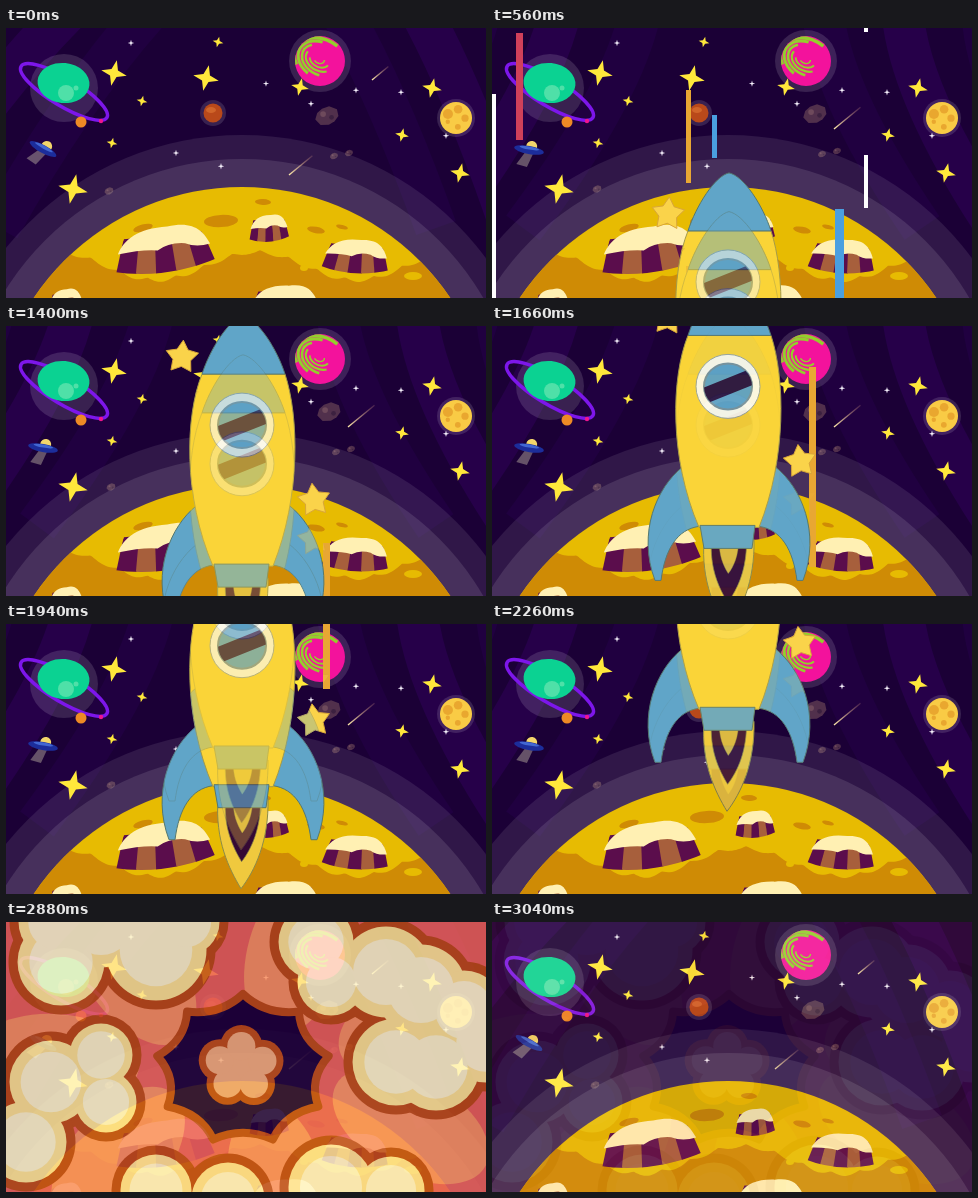
Recreate the animation shown at these times as an HTML page with a canvas. Size 480x270 px, loop 3.06 s.

```html
<!DOCTYPE html>
<html lang="en">
<head>
<meta charset="utf-8">
<title>Rocket launch</title>
<style>
html, body { margin: 0; width: 100%; height: 100%; overflow: hidden; background: #1b0036; }
canvas { display: block; width: 100vw; height: 100vh; }
</style>
</head>
<body>
<canvas id="stage" width="480" height="270"></canvas>
<script>
const W = 480, H = 270, LOOP = 3060, TAU = Math.PI * 2;
const INK = '#bd4a14', YELLOW = '#fdd04d', BLUE = '#60a5c8', RIM = '#55776e', GOLD = '#fad437';
let g;

// ---- helpers ----
function paint(fill, stroke, width = 1) {
  if (fill) { g.fillStyle = fill; g.fill(); }
  if (stroke) { g.strokeStyle = stroke; g.lineWidth = width; g.stroke(); }
}

function oval(x, y, rx, ry, fill, turn = 0, stroke, width) {
  g.beginPath();
  g.ellipse(x, y, rx, ry, turn, 0, TAU);
  paint(fill, stroke, width);
}
const disc = (x, y, r, fill, stroke, width) => oval(x, y, r, r, fill, 0, stroke, width);

function shape(d, fill, stroke, width) {
  const path = new Path2D(d);
  if (fill) { g.fillStyle = fill; g.fill(path); }
  if (stroke) { g.strokeStyle = stroke; g.lineWidth = width || 1; g.stroke(path); }
}

function placed(x, y, turn, draw) {
  g.save();
  g.translate(x, y);
  g.rotate(turn);
  draw();
  g.restore();
}

function star(x, y, r, points, inner, turn, fill, stroke) {
  g.beginPath();
  for (let i = 0; i < points * 2; i++) {
    const a = turn + i * Math.PI / points, d = i % 2 ? r * inner : r;
    g.lineTo(x + d * Math.sin(a), y - d * Math.cos(a));
  }
  g.closePath();
  paint(fill, stroke);
}

function seeded(seed) {
  return () => (seed = seed * 16807 % 2147483647) / 2147483647;
}

// ---- space ----
function sky(drift) {
  g.fillStyle = '#1b0036';
  g.fillRect(0, 0, W, H);
  for (const side of [-1, 1]) {
    for (let i = 0; i < 3; i++) {
      const top = 240 + side * (90 + 80 * i);
      const low = 240 + side * (190 + 75 * i) * (side < 0 ? 1.3 - 0.2 * drift : 1);
      g.beginPath();
      g.moveTo(top, -25);
      g.quadraticCurveTo((top + low) / 2 - side * 45 * drift, 60, low, 200);
      paint(null, i % 2 ? '#260049' : '#200040', 42);
    }
  }
}

function meteor(x, y, len, alpha) {
  const dx = len * 0.78, dy = -len * 0.64;
  const fade = g.createLinearGradient(x, y, x + dx, y + dy);
  fade.addColorStop(0, `rgba(255,235,170,${alpha})`);
  fade.addColorStop(1, 'rgba(190,130,120,.25)');
  g.beginPath();
  g.moveTo(x, y);
  g.lineTo(x + dx, y + dy);
  paint(null, fade, 1.4);
}

function rock(x, y, r) {
  g.beginPath();
  for (let a = 0; a < TAU; a += TAU / 9) {
    const d = r * (0.88 + 0.12 * Math.sin(a * 7));
    g.lineTo(x + d * Math.cos(a), y + d * 0.82 * Math.sin(a));
  }
  paint('#51304c');
  disc(x - r * .3, y - r * .15, r * .22, '#6e4a5c');
  disc(x + r * .35, y + r * .1, r * .18, '#3c2140');
}

function halo(x, y, r) {
  disc(x, y, r, 'rgba(255,255,255,.13)');
}

function ringed() {
  halo(58, 60, 34);
  oval(58, 64, 50, 14, null, 0.54, '#7d16ea', 3.5);
  oval(57.5, 55, 26, 20, '#0bd292', 0.1);
  disc(60, 65, 8, '#4fe0a8');
  disc(70, 60, 2.5, '#4fe0a8');
  disc(75, 94, 5.5, '#ee8a25');
  disc(95, 93, 2.2, '#f0158e');
}

function swirled() {
  halo(314, 33, 31);
  g.save();
  disc(314, 33, 25, '#f3129c');
  g.clip();
  for (let i = 0; i < 6; i++) {
    const r = 5 + i * 4, a = i * 0.55 - 0.4;
    g.beginPath();
    g.ellipse(313 + i * 0.5, 31 + i * 0.4, r * 1.15, r * 0.85, 0.5, a, a + 2.6);
    paint(null, '#93cf2c', 1.4 + i * 0.4);
  }
  g.restore();
}

function moon() {
  halo(450, 90, 19);
  disc(450, 90, 16, '#f9cb45');
  for (let i = 0; i < 5; i++) {
    const a = 3.6 + i * 1.35;
    disc(450 + 9 * Math.cos(a), 90 + 9 * Math.sin(a), 5 - i * 0.7, '#e9a72f');
  }
}

function ufo(drift) {
  placed(37, 121 + drift, 0.5 - 0.32 * drift, () => {
    shape('M-3 2H5L1 17L-10 16Z', 'rgba(205,195,175,.42)');
    disc(2, -4, 5.5, '#f3d66b');
    oval(0, 0, 15, 4, '#1c2d9b');
    oval(0, -2, 10, 1.6, '#4267d2');
  });
}

// A fan of panels below a pale, uneven cap; one unit is the full size
function crater(x, y, w, h, turn) {
  placed(x, y, turn, () => {
    g.scale(w, h);
    g.save();
    g.clip(new Path2D('M-.5 .38L-.36 -.3H.36L.5 .3Q0 .68 -.5 .38Z'));
    for (let i = 0; i < 5; i++) {
      const a = -0.5 + i * 0.2, b = a + 0.21;
      shape(`M${a * .7} -.4H${b * .7}L${b} .7H${a}Z`, i % 2 ? '#a75f3c' : '#5b0d4c');
    }
    g.restore();
    shape('M-.43 .02C-.36 -.3 -.22 -.5 .05 -.48C.3 -.56 .38 -.3 .43 -.02Q.3 .04 .2 -.08Q.05 -.14 -.06 .02Q-.2 -.04 -.43 .02Z', '#fff0b3');
  });
}

function ground() {
  const cx = 236, cy = 410, shade = '#cf8b05';
  disc(cx, cy, 303, 'rgba(255,255,255,.09)');
  disc(cx, cy, 279, 'rgba(255,255,255,.11)');
  g.save();
  disc(cx, cy, 251, '#e7bb02');
  g.clip();
  g.beginPath();
  for (let x = 0; x <= W; x += 2) {
    g.lineTo(x, 236 - 14 * Math.cos((x - 250) * Math.PI / 100) + 4 * Math.abs(Math.sin(x / 9)));
  }
  g.lineTo(W, H);
  g.lineTo(0, H);
  paint(shade);
  [[215, 193, 17], [137, 200, 10], [257, 174, 8], [310, 202, 9], [336, 199, 6]]
    .forEach(([x, y, r]) => oval(x, y, r, r * 0.36, shade, (x - cx) / 400));
  oval(298, 240, 4, 3, '#e7bb02');
  oval(407, 248, 9, 4, '#e7bb02');
  crater(158, 221, 108, 46, -0.1);
  crater(263, 200, 43, 27, -0.03);
  crater(350, 228, 72, 34, 0.1);
  crater(279, 273, 74, 32, 0);
  crater(60, 272, 36, 22, -0.1);
  g.restore();
}

function space(drift) {
  sky(drift);
  ringed();
  swirled();
  moon();
  halo(207, 85, 13);
  disc(207, 85, 9.5, '#b9491a');
  oval(205, 82, 5, 3, '#d0652a');
  [[321, 88, 13], [343, 125, 4.5], [328, 128, 4.5], [103, 163, 5]]
    .forEach(([x, y, r]) => rock(x + 2 * drift, y - 2 * drift, r));
  ground();
  [[108, 45, 13], [200, 50, 13], [136, 73, 5.5], [106, 115, 5.5], [67, 161, 15],
   [212, 14, 5.5], [294, 59, 9], [426, 60, 10], [396, 107, 7], [454, 145, 10]]
    .forEach(([x, y, r]) => star(x, y, r, 4, 0.36, 0.22, '#ffe83b'));
  const rnd = seeded(29);
  for (let i = 0; i < 8; i++) star(125 + 45 * i, 15 + 135 * rnd(), 3.2, 4, 0.32, 0, '#f4eefa');
  meteor(366 - 24 * drift, 52 + 49 * drift, 21 + 13 * drift, 1);
  if (drift < 1) meteor(283, 147, 30, 1);
  ufo(drift);
}

// ---- rocket, drawn from its tip ----
function flame(size, fill) {
  placed(0, 262, 0, () => {
    g.scale(size, size);
    shape('M-25 0C-28 42 -14 70 -2 90C12 72 26 42 25 0Z', fill, '#8a8a4a');
  });
}

function rocket(tip) {
  const line = '#a39a4a';
  placed(237, tip, 0, () => {
    flame(1, '#f0c93e');
    flame(0.7, '#350934');
    flame(0.38, '#d8b643');
    for (const side of [-1, 1]) {
      g.save();
      g.scale(side, 1);
      shape('M47 190C72 210 92 255 74 303H68C64 272 52 252 30 249Z', BLUE, RIM);
      g.restore();
    }
    shape('M-41 58C-58 100 -60 180 -30 250H30C58 180 56 100 42 58Z', GOLD, line);
    shape('M-41 58C-33 33 -14 3 0 0C15 3 34 33 42 58Z', BLUE, RIM);
    shape('M-29 248H26L23 271H-25Z', BLUE, RIM);
    disc(-1, 109, 32, '#fbf8e8', '#9aa49a');
    g.save();
    oval(-1, 109, 24, 23, '#5b9fc4', 0, '#77919a', 2);
    g.clip();
    shape('M-30 112L30 88V105L-30 129Z', '#24103f');
    g.restore();
    star(-61, 41, 17, 5, 0.55, 0.08, '#fad34a', '#d8a53a');
    star(71, 184, 17, 5, 0.55, -0.12, '#fad34a', '#d8a53a');
  });
}

// x, top, width, height; all race upwards together
const STREAKS = {
  '#d0405a': [[24, 5, 7, 107]],
  '#e8a733': [[194, 62, 5, 93], [317, 921, 7, 200]],
  '#4a9fe0': [[220, 87, 5, 43], [343, 181, 9, 120]],
  '#ffffff': [[0, 66, 4, 204], [372, -49, 4, 53], [372, 127, 4, 53]]
};
function flight(k) {
  for (const [color, bars] of Object.entries(STREAKS)) {
    g.fillStyle = color;
    bars.forEach(([x, y, w, h]) => g.fillRect(x, y - 176 * (k - 3), w, h));
  }
  rocket(261 - 38.7 * k);
}

// ---- explosion ----
// Cloud made of overlapping circles with one shared outline
function cloud(circles, fill, width, core) {
  circles.forEach(([x, y, r]) => disc(x, y, r + width / 2, INK));
  circles.forEach(([x, y, r]) => disc(x, y, r - width / 2, fill));
  if (core) circles.forEach(([x, y, r]) => disc(x, y, r * 0.66, core));
}

function flower(cx, cy, r, fill, width) {
  const petals = [[cx, cy, r * 0.5]];
  for (let i = 0; i < 5; i++) {
    const a = i * TAU / 5 - 0.3;
    petals.push([cx + r * 0.56 * Math.cos(a), cy + r * 0.52 * Math.sin(a), r * 0.44]);
  }
  cloud(petals, fill, width);
}

// Spikes joined by arcs that bend inwards
function burst(cx, cy, rx, ry, spikes, fill, width) {
  const at = (i, k) => {
    const a = i * TAU / spikes - TAU / 4;
    return [cx + rx * k * Math.cos(a), cy + ry * k * Math.sin(a)];
  };
  g.beginPath();
  g.moveTo(...at(0, 1));
  for (let i = 0; i < spikes; i++) g.quadraticCurveTo(...at(i + 0.5, 0.76), ...at(i + 1, 1));
  g.closePath();
  paint(fill, INK, width);
}

function blast() {
  const cream = '#fff6b8', core = '#fffcd0', orange = '#ff7848';
  g.fillStyle = orange;
  g.fillRect(0, 0, W, H);
  [[-28, 140, 50], [-20, 280, 50], [505, 140, 50], [430, 225, 45]]
    .forEach(([x, y, r]) => disc(x, y, r, orange, INK, 6));
  cloud([[100, 10, 55], [105, 130, 88], [180, 262, 72], [345, -5, 45], [375, 110, 82],
    [395, 160, 55], [320, 270, 65], [240, 130, 130]], YELLOW, 9);
  cloud([[98, 110, 30], [135, 85, 28], [170, 30, 50], [140, 0, 45]], cream, 8, core);
  cloud([[300, 8, 38], [305, 60, 35], [352, 76, 43], [360, 125, 37], [355, 160, 29]], cream, 8, core);
  cloud([[140, 193, 28], [158, 196, 32], [182, 227, 34], [232, 252, 42], [305, 225, 36],
    [330, 258, 31], [275, 272, 45]], cream, 8, core);
  burst(239, 146, 56, 55, 11, '#f9733f', 6);
  flower(238, 143, 20, YELLOW, 5);
}

function openBlast() {
  const cream = '#ffe492', core = '#fff5c8';
  g.fillStyle = '#ec6058';
  g.fillRect(0, 0, W, H);
  for (let i = 0; i < 7; i++) {
    const a = i * TAU / 7 + 0.5;
    oval(238 + 190 * Math.cos(a), 146 + 120 * Math.sin(a), 85, 48, '#fa9060', a);
  }
  cloud([[55, 40, 48], [50, 0, 42], [95, 0, 50], [150, 28, 55], [180, 0, 38]], cream, 9, core);
  cloud([[310, 20, 42], [325, 60, 38], [380, 50, 50], [415, 68, 50], [390, 140, 48],
    [430, 145, 48], [458, 88, 44], [480, 120, 45]], cream, 9, core);
  cloud([[95, 133, 36], [45, 160, 46], [100, 180, 35], [20, 220, 45]], cream, 9, core);
  cloud([[150, 268, 40], [222, 277, 41], [325, 265, 47], [385, 268, 38]], cream, 9, core);
  burst(237, 147, 87, 75, 9, '#1b0036', 8);
  flower(235, 145, 40, '#f0a878', 7);
}

// ---- timeline ----
function layer(draw) {
  const c = document.createElement('canvas');
  c.width = W;
  c.height = H;
  g = c.getContext('2d');
  g.lineJoin = 'round';
  draw();
  return c;
}

const early = layer(() => space(0)), late = layer(() => space(1));
const poses = [];
for (let k = 0; k <= 12; k++) {
  poses.push({ at: 40 + 204 * k, image: layer(() => k && flight(k)) });
}
poses.push({ at: 2610, image: layer(blast) }, { at: 2850, image: layer(openBlast) },
  { at: LOOP, image: early });

const front = layer(() => {}), fg = front.getContext('2d');
const stage = document.getElementById('stage').getContext('2d');
const clamp = v => Math.min(1, Math.max(0, v));
const start = performance.now();

function put(ctx, image, alpha) {
  ctx.globalAlpha = alpha;
  ctx.drawImage(image, 0, 0);
}

// The stronger pose sets the hard outline; the weaker one tints it
function blendPoses(a, b, mix) {
  const swap = mix >= 0.5;
  fg.globalCompositeOperation = 'copy';
  put(fg, swap ? b : a, 1);
  fg.globalCompositeOperation = 'source-atop';
  put(fg, swap ? a : b, swap ? 1 - mix : mix);
}

function frame() {
  const t = Math.floor(((performance.now() - start) % LOOP) / 20) * 20;
  const i = Math.max(1, poses.findIndex(p => p.at > t));
  const a = poses[i - 1], b = poses[i];
  blendPoses(a.image, b.image, clamp((t - a.at) / (b.at - a.at)));
  put(stage, early, 1);
  put(stage, late, clamp((t - 40) / 400));
  put(stage, front, 1);
  requestAnimationFrame(frame);
}
frame();
</script>
</body>
</html>
```
